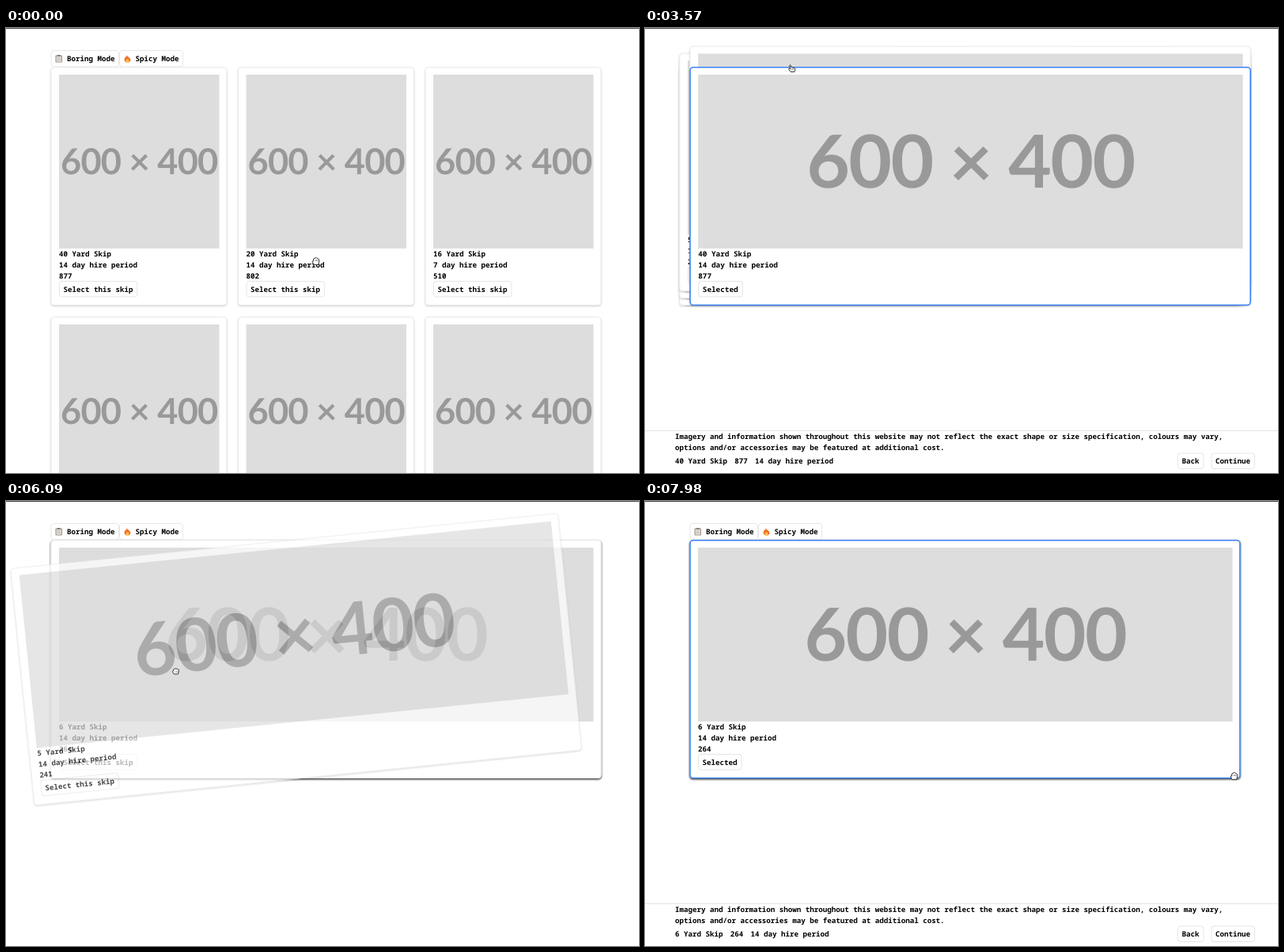
Write an HTML page with a canvas that moves like this. It is 800 px wide and 563 px high and loops after 8000 ms.

```html
<!DOCTYPE html>
<html lang="en">
<head>
<meta charset="utf-8">
<title>Skip picker</title>
<style>
  html, body { margin: 0; width: 100%; height: 100%; overflow: hidden; background: #fff; }
  canvas { display: block; }
</style>
</head>
<body>
<canvas id="stage" width="800" height="563"></canvas>
<script>
const LOOP = 8000, W = 800, H = 563;
const MONO = '600 9.16px "Noto Sans Mono", "DejaVu Sans Mono", monospace';
const CHAR = 5.496;
const LINE = '#e5e5e5', BLUE = '#3b82f6';
const LEFT = 56.7, TOP = 49.5, CARD_H = 301.3, GRID_W = 222.5, WIDE_W = 695.5;

const stage = document.getElementById('stage').getContext('2d');
const layer = document.createElement('canvas');
layer.width = W;
layer.height = H;
const layerCtx = layer.getContext('2d');

// size, hire days, price
const skips = [
  [40, 14, 877], [20, 14, 802], [16, 7, 510], [14, 7, 470], [12, 7, 439],
  [10, 7, 400], [8, 14, 295], [6, 14, 264], [5, 14, 241], [4, 14, 211]
].map(([size, days, price], i) => ({
  size, price, i,
  name: size + ' Yard Skip',
  hire: days + ' day hire period',
  x: LEFT + (i % 3) * 236.5,
  y: TOP + Math.floor(i / 3) * 316
}));

const SPREAD = 3190;
const picks = [[1190, 40], [4850, 0], [6800, 6]];
const drags = [
  { size: 40, from: 4500, to: 4850 },
  { size: 4, from: 5080, to: 5430 },
  { size: 5, from: 5800, to: 6150 },
  { size: 6, from: 6440, to: 6800, keep: true }
];
const path = [
  [0, 391, 295], [560, 391, 295], [700, 391, 258], [840, 391, 258],
  [1150, 116, 330], [1890, 118, 328], [2500, 165, 18], [2800, 173, 52],
  [2940, 174, 58], [3130, 184, 47], [3570, 185, 51], [3800, 195, 75],
  [4200, 325, 185], [4500, 325, 185], [4820, 207, 182], [5080, 207, 182],
  [5420, 85, 185], [5730, 322, 212], [5800, 322, 212], [6090, 214, 215],
  [6440, 214, 215], [6660, 692, 215], [7300, 692, 215], [7880, 744, 348],
  [8000, 744, 348]
];

function pointerAt(t) {
  const n = path.findIndex(k => k[0] > t);
  const [t0, x0, y0] = path[n - 1], [t1, x1, y1] = path[n];
  const u = (t - t0) / (t1 - t0), e = u * u * (3 - 2 * u);
  return { x: x0 + (x1 - x0) * e, y: y0 + (y1 - y0) * e };
}

function spring(ms) {
  if (ms <= 0) return 0;
  const s = ms / 1000, wd = 8.27, decay = 9.41;
  return 1 - Math.exp(-decay * s) * (Math.cos(wd * s) + decay / wd * Math.sin(wd * s));
}

// The card follows the pointer elastically, then returns or is dropped.
function pull(d, t) {
  const offset = at => 0.35 * (pointerAt(at).x - pointerAt(d.from).x);
  if (t < d.from) return 0;
  if (t < d.to) return offset(t);
  const s = (t - d.to) / 1000;
  return offset(d.to) * Math.exp(-14 * s) * (1 + 14 * s);
}

function box(c, x, y, w, h, r, fill, stroke, lw = 1) {
  c.beginPath();
  c.roundRect(x, y, w, h, r);
  if (fill) { c.fillStyle = fill; c.fill(); }
  if (stroke) { c.strokeStyle = stroke; c.lineWidth = lw; c.stroke(); }
}

function text(c, str, x, y) {
  c.font = MONO;
  c.textAlign = 'left';
  c.fillStyle = '#000';
  c.fillText(str, x, y);
}

function button(c, label, x, y) {
  box(c, x + .5, y + .5, label.length * CHAR + 10.5, 19.5, 3, '#fff', LINE);
  text(c, label, x + 5.5, y + 13.5);
}

function placeholder(c, x, y, w, h) {
  const scale = Math.max(w / 600, h / 400), size = 82.2 * scale;
  c.fillStyle = '#ddd';
  c.fillRect(x, y, w, h);
  c.font = `bold ${size}px Lato, sans-serif`;
  c.letterSpacing = `${-.0168 * size}px`;
  c.textAlign = 'center';
  c.fillStyle = '#999';
  c.fillText('600 × 400', x + w / 2, y + h / 2 + 29.4 * scale);
  c.letterSpacing = '0px';
}

function card(c, skip, x, y, w, full, selected) {
  c.save();
  c.translate(x, y);
  c.save();
  c.shadowColor = 'rgba(0,0,0,.2)';
  c.shadowBlur = 2.6;
  c.shadowOffsetY = 1.3;
  box(c, 0, 0, w, CARD_H, 4, '#fff');
  c.restore();
  box(c, .3, .3, w - .6, CARD_H - .6, 4, '#fff', selected ? BLUE : LINE, selected ? 1.6 : .8);
  c.scale(w / full, 1);
  placeholder(c, 10.3, 9.5, full - 20, 220);
  text(c, skip.name, 10.3, 239.5);
  text(c, skip.hire, 10.3, 253.5);
  text(c, String(skip.price), 10.3, 267);
  button(c, selected ? 'Selected' : 'Select this skip', 10.3, 270.5);
  c.restore();
}

function swipedCard(skip, dx, selected) {
  const alpha = 1 - Math.abs(dx) / 135;
  if (alpha <= 0) return;
  const cx = LEFT + WIDE_W / 2, cy = TOP + CARD_H / 2;
  layerCtx.clearRect(0, 0, W, H);
  layerCtx.save();
  layerCtx.translate(cx + dx, cy);
  layerCtx.rotate(dx * .153 * Math.PI / 180);
  card(layerCtx, skip, -WIDE_W / 2, -CARD_H / 2, WIDE_W, WIDE_W, selected);
  layerCtx.restore();
  stage.globalAlpha = alpha;
  stage.drawImage(layer, 0, 0);
  stage.globalAlpha = 1;
}

function modeButtons(c) {
  box(c, 57, 28.5, 85.5, 20.5, 3.5, '#fff', LINE, .9);
  box(c, 143.5, 28.5, 80, 20.5, 3.5, '#fff', LINE, .9);
  text(c, 'Boring Mode', 77, 42);
  text(c, 'Spicy Mode', 163.5, 42);

  box(c, 62.5, 34.5, 8.5, 9, 1, '#a48f7c');
  box(c, 63.6, 35.8, 6.3, 6.8, 0, '#e4e4e2');
  box(c, 65, 34, 3.5, 1.7, .5, '#777');
  c.fillStyle = '#aaa';
  for (let y = 37.3; y < 42; y += 1.6) c.fillRect(64.5, y, 4.5, .6);

  c.fillStyle = '#f4702c';
  c.beginPath();
  c.moveTo(152.7, 34);
  c.bezierCurveTo(153, 36.5, 157.4, 37.5, 157.4, 40.5);
  c.bezierCurveTo(157.4, 44.6, 149.8, 44.6, 149.6, 40.5);
  c.bezierCurveTo(149.5, 38.8, 150.4, 38, 150.6, 37);
  c.quadraticCurveTo(152.8, 36.5, 152.7, 34);
  c.fill();
  c.fillStyle = '#ffc83d';
  c.beginPath();
  c.ellipse(153.5, 41.4, 1.9, 2, 0, 0, 7);
  c.fill();
}

function footer(c, skip) {
  c.fillStyle = '#fff';
  c.fillRect(0, 509, W, 54);
  c.fillStyle = LINE;
  c.fillRect(0, 509, W, 1);
  text(c, 'Imagery and information shown throughout this website may not reflect the exact shape or size specification, colours may vary,', 38, 520.3);
  text(c, 'options and/or accessories may be featured at additional cost.', 38, 534);
  let x = 38;
  for (const part of [skip.name, String(skip.price), skip.hire]) {
    text(c, part, x, 551);
    x += part.length * CHAR + 9.3;
  }
  button(c, 'Back', 673, 537.5);
  button(c, 'Continue', 715.5, 537.5);
}

const hands = {
  open: 'M-2.5 4.5L-4.5 .8Q-4.6-.8-3-.1L-3.2-2.5Q-2.8-3.7-1.9-2.9Q-1.6-4.7-.4-4.2Q.8-5.2 1.4-3.6Q2.7-4.1 3-2.6Q4.4-2.6 4.2-.8L3 4.5Z',
  closed: 'M-2.3 4L-4.2 1.2Q-4.2-.2-3.1-.1L-3.1-1.8Q-2.4-3.2-1.5-2.4Q-.6-3.5.3-2.6Q1.4-3.3 2.1-2.1Q3.9-2.3 3.8-.4L2.8 4Z',
  point: 'M-1.6 4.5L-4.2 1.3Q-4.2 0-2.8.4L-1.9 1L-3-3.5Q-2.7-4.9-1.7-3.9L-.7-1.1Q.5-1.7 1.1-.8Q2.4-1.2 2.8-.2Q4.3-.2 4.1 1.4L3.2 4.5Z'
};
for (const k in hands) hands[k] = new Path2D(hands[k]);

function cursor(c, t) {
  const { x, y } = pointerAt(t);
  const overButton = (t > 1080 && t < 1960) || (t > 3060 && t < 3700);
  const kind = drags.some(d => t >= d.from && t < d.to) ? 'closed' : overButton ? 'point' : 'open';
  c.save();
  c.translate(x + .7, y);
  c.fillStyle = '#fff';
  c.strokeStyle = '#222';
  c.lineWidth = .9;
  c.lineJoin = 'round';
  c.fill(hands[kind]);
  c.stroke(hands[kind]);
  c.beginPath();
  for (const fx of [-.6, .9, 2.3]) {
    c.moveTo(fx, kind === 'open' ? -1.8 : .4);
    c.lineTo(fx, kind === 'open' ? 0 : 1.8);
  }
  c.lineWidth = .5;
  c.stroke();
  c.restore();
}

function draw(t) {
  const c = stage;
  c.fillStyle = '#fff';
  c.fillRect(0, 0, W, H);
  c.fillStyle = '#484848';
  c.fillRect(0, 0, W, 1);
  modeButtons(c);

  const picked = picks.reduce((size, [at, s]) => t >= at ? s : size, 0);
  const chosen = skips.find(s => s.size === picked);
  const stacked = t >= SPREAD, p = spring(t - SPREAD);
  const full = stacked ? WIDE_W : GRID_W;
  const w = GRID_W + (WIDE_W - GRID_W) * p;
  const order = skips.filter(s => s !== chosen);
  if (chosen) order.push(chosen);

  for (const s of order) {
    const d = drags.find(g => g.size === s.size);
    if (d && !d.keep && t >= d.to) continue;
    const dx = d ? pull(d, t) : 0;
    if (Math.abs(dx) > .05) swipedCard(s, dx, s === chosen);
    else card(c, s, s.x + (LEFT - s.x) * p, s.y + (TOP - s.y) * p, w, full, s === chosen);
  }

  if (chosen) footer(c, chosen);
  cursor(c, t);
}

for (const c of [stage, layerCtx]) c.textRendering = 'geometricPrecision';
const start = performance.now();
function tick() {
  draw((performance.now() - start) % LOOP);
  requestAnimationFrame(tick);
}
tick();
</script>
</body>
</html>
```
